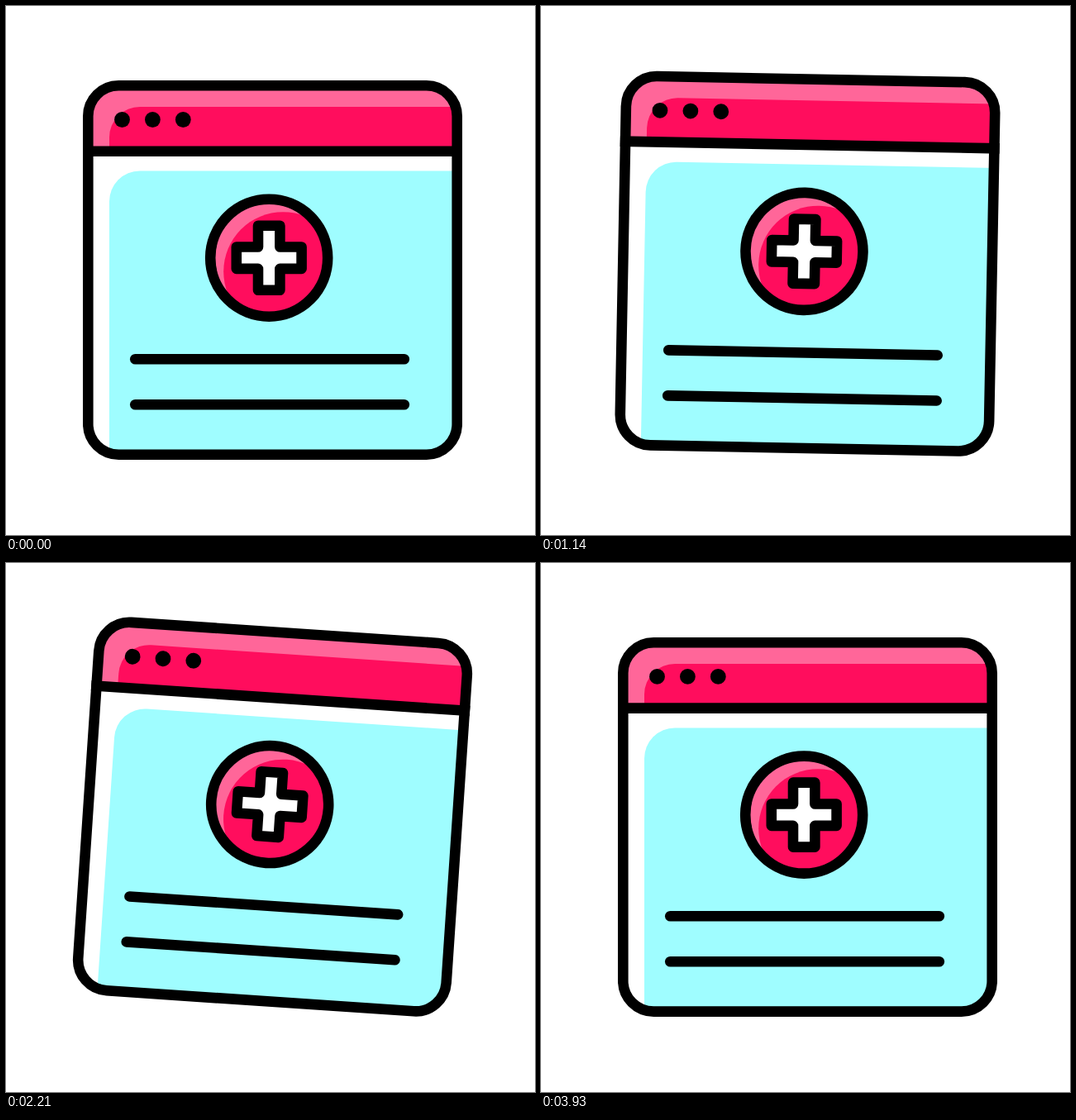
Recreate the animation shown at these times as an HTML page. Size 640 by 640 pixels, loop 4 s.

```html
<!DOCTYPE html>
<html>
<head>
<meta charset="utf-8">
<style>
  html, body { margin: 0; height: 100%; overflow: hidden; background: #fff; }
  svg { display: block; width: 100vw; height: 100vh; }
  .ink { fill: none; stroke: #000; stroke-width: 12.6; stroke-linejoin: round; }
</style>
</head>
<body>
<svg viewBox="0 0 640 640">
  <defs>
    <clipPath id="pane"><rect x="99.3" y="96.3" width="446.4" height="446.4" rx="37"/></clipPath>
    <clipPath id="disc"><circle r="71"/></clipPath>
  </defs>
  <g id="card">
    <g clip-path="url(#pane)">
      <path fill="#fff" d="M90 90H550V550H90Z"/>
      <path fill="#ff6699" d="M90 90H550V176H90Z"/>
      <path fill="#ff0d5d" d="M125 176V159A37 37 0 0 1 162 122H550V176Z"/>
      <path fill="#9ffdff" d="M125 550V236.500A37 37 0 0 1 162 199.500H550V550Z"/>
    </g>
    <circle cx="140.500" cy="137.500" r="9.400"/>
    <circle cx="177.400" cy="137.500" r="9.400"/>
    <circle cx="214.300" cy="137.500" r="9.400"/>
    <rect class="ink" x="99.300" y="96.300" width="446.400" height="446.400" rx="37"/>
    <path class="ink" d="M93 175.700H552"/>
    <g class="ink" stroke-linecap="round">
      <path d="M156.300 427.300H481.800"/>
      <path id="lowerLine" d="M156.300 482.300H481.800"/>
    </g>
    <g id="badge">
      <g clip-path="url(#disc)">
        <circle r="71" fill="#ff6699"/>
        <circle cx="17" cy="16.500" r="72" fill="#ff0d5d"/>
      </g>
      <circle class="ink" r="71"/>
      <path class="ink" style="fill:#fff" d="M-13.200 -39H13.200V-13.200H39.400V13.200H13.200V39H-13.200V13.200H-39.400V-13.200H-13.200Z"/>
    </g>
  </g>
</svg>
<script>
const LOOP = 4000;
const [card, badge, lowerLine] = ['card', 'badge', 'lowerLine'].map(id => document.getElementById(id));

// [time in ms, degrees]
const swing = [[0, 0], [1050, 0], [1385, 6], [1780, -5], [2175, 4], [2600, -3], [3080, 1.6], [3500, 0], [LOOP, 0]];

const smooth = u => u * u * (3 - 2 * u);

// Rises from 0 to 1 at the peak and falls back, each within `half` ms.
const pulse = (t, peak, half) => smooth(Math.max(0, 1 - Math.abs(t - peak) / half));

function keyed(keys, t) {
  const i = keys.findIndex(([time]) => time > t);
  const [[t0, v0], [t1, v1]] = [keys[i - 1], keys[i]];
  return v0 + (v1 - v0) * smooth((t - t0) / (t1 - t0));
}

function draw(now) {
  const t = now % LOOP;
  const lift = -12.8 * pulse(t, LOOP / 2, LOOP / 2);
  const scale = 1 + 0.2 * pulse(t % 2000, 683, 417);
  card.setAttribute('transform', `translate(0 ${lift}) rotate(${keyed(swing, t)} 322.5 319.5)`);
  badge.setAttribute('transform', `translate(318.2 304.7) scale(${scale})`);
  lowerLine.setAttribute('transform', `translate(0 ${12 * pulse(t, 500, 450)})`);
  requestAnimationFrame(() => draw(performance.now()));
}
draw(performance.now());
</script>
</body>
</html>
```
